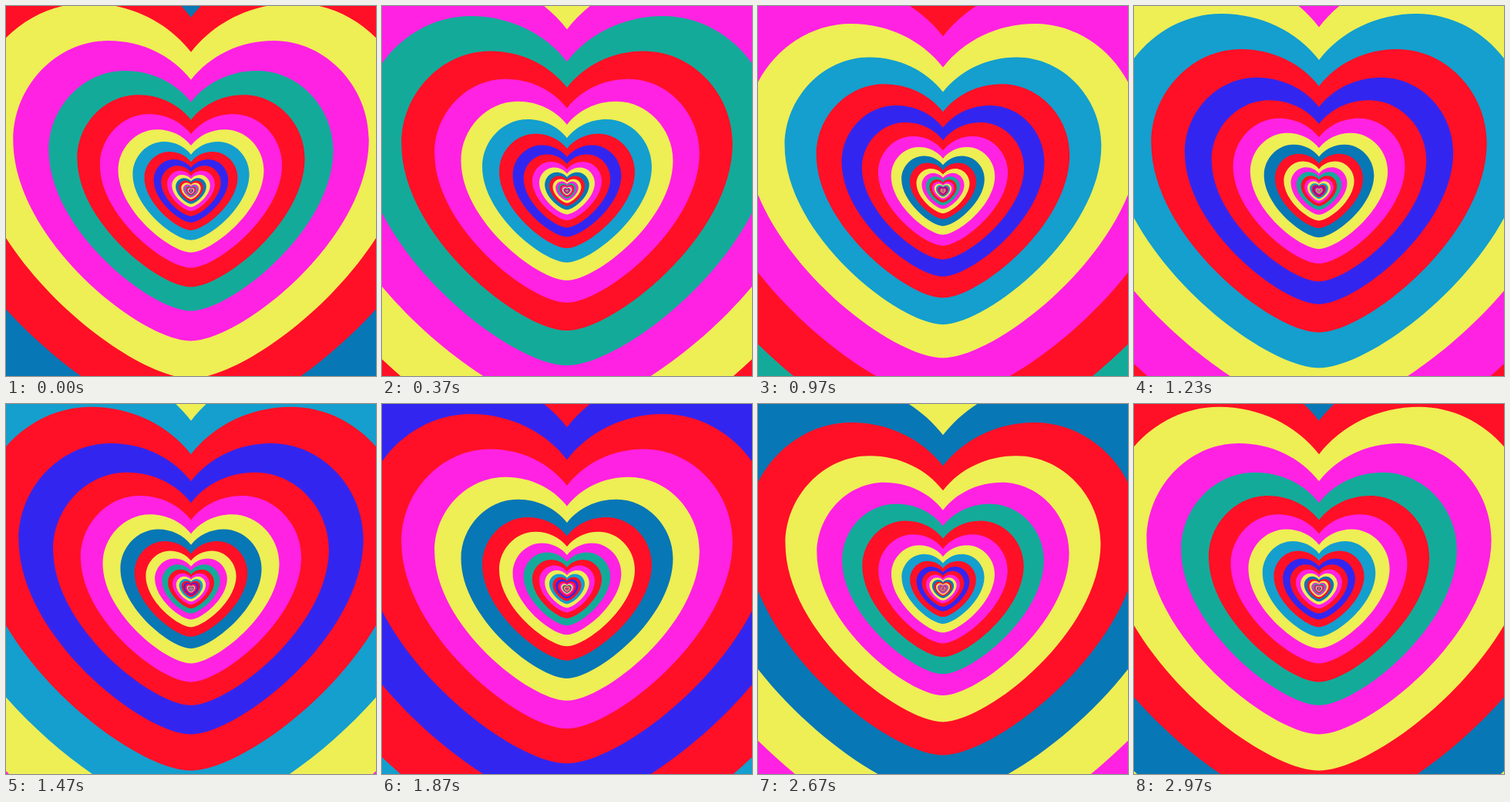
Recreate the animation shown at these times as an HTML page with a canvas. Size 480 px wide and 480 px high, loop 3.01 s.

```html
<!DOCTYPE html>
<html lang="en">
<head>
<meta charset="utf-8">
<title>Heart tunnel</title>
<style>
html, body { margin: 0; width: 100%; height: 100%; overflow: hidden; }
canvas { display: block; width: 480px; height: 480px; }
</style>
</head>
<body>
<canvas width="480" height="480"></canvas>
<script>
const ctx = document.querySelector('canvas').getContext('2d');
const LOOP = 3010, FRAMES = 90, POSES = 100, RATIO = 1.25;

const red = '#ff1026', yellow = '#eeee55', magenta = '#ff22e2', teal = '#14aa9a',
  sky = '#149fce', indigo = '#3325f0', blue = '#0877b5';
// From the outside in; the order repeats without end.
const colors = [blue, red, yellow, magenta, teal, red, magenta,
  yellow, sky, red, indigo, red, magenta, yellow];

// Unit heart: half width 1, centred on the zoom point.
const half = s => `M0 -.625 C${.105 * s} -.76 ${.275 * s} -.845 ${.465 * s} -.845` +
  `C${.76 * s} -.845 ${s} -.585 ${s} -.288 C${s} .275 ${.28 * s} .843 0 .843Z`;
const heart = new Path2D(half(1) + half(-1));

// The zoom has 100 even poses; showing 90 frames skips every tenth one.
function phaseAt(time) {
  const frame = Math.min(FRAMES - 1, Math.floor((time % LOOP + 4) * 3 / 100));
  return Math.round(frame * POSES / FRAMES) / POSES * colors.length;
}

function draw(time) {
  const phase = phaseAt(time);
  const first = Math.floor(phase) - 2;
  for (let i = first; i < first + 34; i++) {
    const size = 230.7 * RATIO ** (3 - i + phase);
    ctx.setTransform(size, 0, 0, size, 240, 240);
    ctx.fillStyle = colors[(i + colors.length) % colors.length];
    ctx.fill(heart);
  }
}

const start = performance.now();
function tick() {
  draw(performance.now() - start);
  requestAnimationFrame(tick);
}
tick();
</script>
</body>
</html>
```
